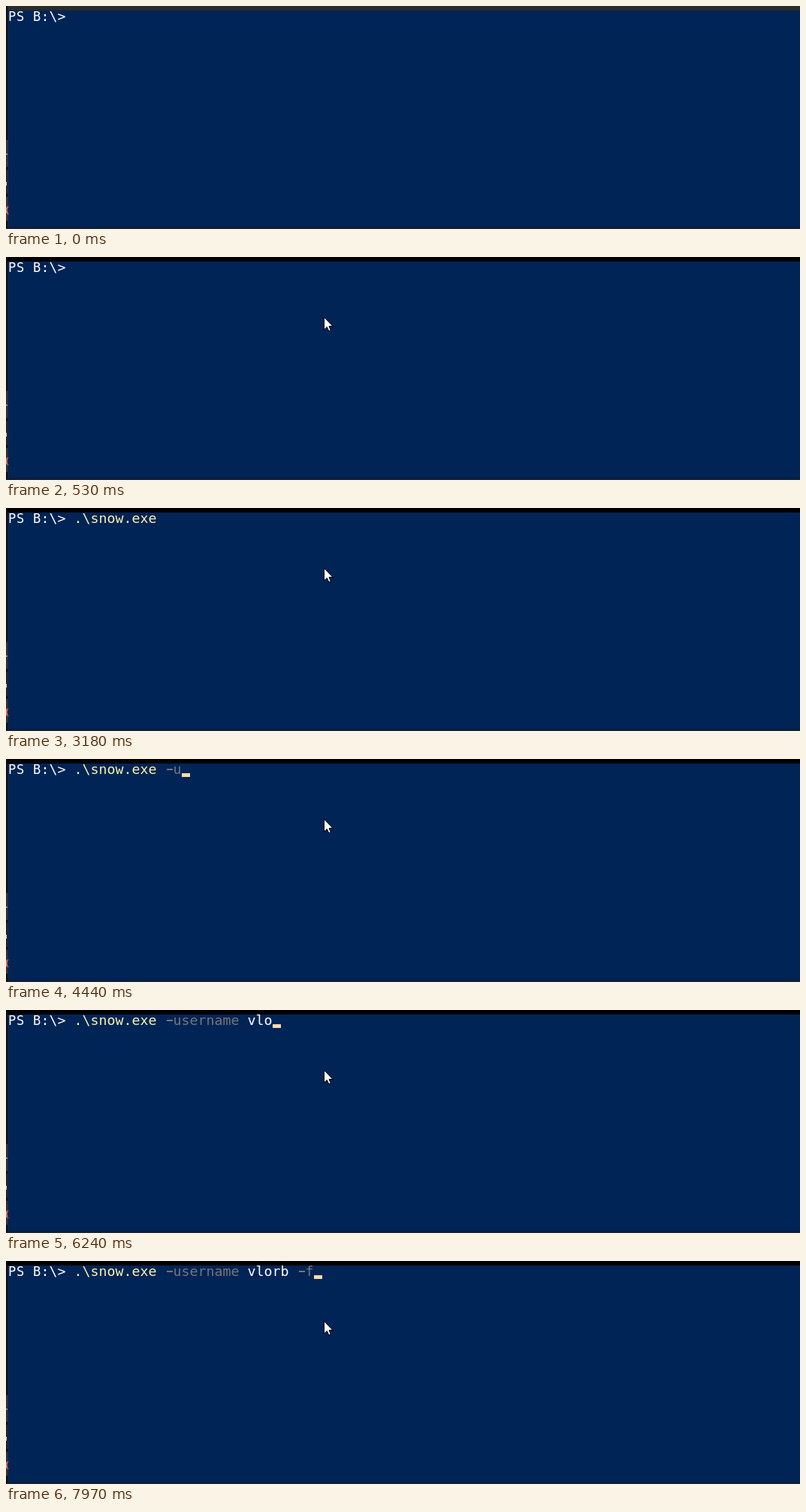
An HTML page with a canvas for the animation above (8000 ms loop, 1057 by 298 pixels).

```html
<!DOCTYPE html>
<html lang="en">
<head>
<meta charset="utf-8">
<title>Terminal</title>
<style>
  html, body { margin: 0; width: 100%; height: 100%; overflow: hidden; background: #012456; }
  canvas { display: block; }
</style>
</head>
<body>
<canvas id="stage" width="1057" height="298"></canvas>
<script>
const ctx = document.getElementById('stage').getContext('2d');
const W = 1057, H = 298, LOOP = 8000;
const LEFT = 3, CELL = 11, BASE = 20;
const BLINK = 530, FOCUS = 530;
const PROMPT = 'PS B:\\> ';
const COMPLETION = '.\\snow.exe';
const COLORS = { prompt: '#fff', command: '#fbf3a7', param: '#767676', caret: '#fedba9' };

// Bursts of typing: keys, start, time between keys. Tab completes the command.
const BURSTS = [
  ['sno', 1990, 165],
  ['\t', 2650, 0],
  [' ', 3510, 0],
  ['-', 4180, 0],
  ['user', 4440, 110],
  ['name', 5110, 86],
  [' vlo', 5570, 223],
  ['r', 6305, 0],
  ['b -', 6700, 300],
  ['f', 7970, 0]
];
const KEYS = BURSTS.flatMap(([keys, start, gap]) =>
  [...keys].map((ch, i) => ({ ch, at: start + i * gap })));

function rect(color, x, y, w, h) {
  ctx.fillStyle = color;
  ctx.fillRect(x, y, w, h);
}

// Capitals are shorter than ascenders, and the dash is a flat bar.
function drawText(text, col, color) {
  ctx.textAlign = 'center';
  ctx.textBaseline = 'alphabetic';
  [...text].forEach((ch, i) => {
    const x = LEFT + (col + i) * CELL;
    if (ch === '-') return rect(color, x + 2, 13, 8, 2);
    const size = /[A-Z]/.test(ch) ? 17 : 18.27;
    ctx.font = `${size}px "DejaVu Sans Mono", monospace`;
    ctx.fillStyle = color;
    ctx.fillText(ch, x + CELL / 2 - 0.5, BASE);
  });
}

function drawCommand(text) {
  let col = PROMPT.length;
  text.split(' ').forEach((word, i) => {
    const color = i === 0 ? COLORS.command : word[0] === '-' ? COLORS.param : COLORS.prompt;
    drawText(word, col, color);
    col += word.length + 1;
  });
}

function drawWindow(focused) {
  rect('#012456', 0, 0, W, H);
  rect('#0b0d11', 0, 0, 3, H);
  rect('#303134', 0, 179, 3, 36);
  rect('#222326', 0, 219, 3, 32);
  rect('#303134', 0, 255, 3, 32);
  rect('#8b8d90', 0, 197, 2, 2);
  rect('#d5d6d8', 0, 235, 1, 5);
  ctx.strokeStyle = '#f0705c';
  ctx.lineWidth = 2;
  ctx.beginPath();
  ctx.arc(7, 273, 6.5, Math.PI * 0.7, Math.PI * 1.3);
  ctx.stroke();
  rect(focused ? 'rgba(40,44,52,.75)' : 'rgba(60,64,70,.5)', 2, 6, 1, H - 6);
  rect('#0a1c3f', 3, 295, W - 3, 2);
  rect('#20262f', 0, 297, W, 1);
  rect(focused ? '#000' : '#2b2b2b', 2, 0, W - 2, 6);
}

function drawPointer(t) {
  if (t < 130) return;
  const step = Math.min(6, Math.floor((t - 130) / 66.6));
  const rest = (1 - step / 6) ** 2;
  const x = 423.5 + 220 * rest, y = 80.5 + 165 * rest;
  ctx.beginPath();
  [[0, 0], [0, 16.5], [3.8, 13], [6.3, 18.5], [8.8, 17.5], [6.5, 12], [11.5, 12]]
    .forEach(([dx, dy]) => ctx.lineTo(x + dx, y + dy));
  ctx.closePath();
  ctx.fillStyle = '#fff';
  ctx.fill();
  ctx.strokeStyle = '#000';
  ctx.lineWidth = 1;
  ctx.stroke();
}

// Each key shows the caret; a steady timer then toggles it.
function caretVisible(t, lastKey) {
  const toggles = Math.floor(t / BLINK) - Math.floor(lastKey / BLINK);
  return t >= FOCUS && toggles % 2 === 0;
}

function draw(now) {
  const t = now % LOOP;
  const pressed = KEYS.filter(key => key.at <= t);
  const typed = pressed.reduce((text, { ch }) => ch === '\t' ? COMPLETION : text + ch, '');
  const lastKey = pressed.length ? pressed[pressed.length - 1].at : 0;
  drawWindow(t >= FOCUS);
  drawText(PROMPT, 0, COLORS.prompt);
  drawCommand(typed);
  if (caretVisible(t, lastKey)) {
    rect(COLORS.caret, LEFT + (PROMPT.length + typed.length) * CELL, 19, CELL, 5);
  }
  drawPointer(t);
}

const start = performance.now();
function tick() {
  draw(performance.now() - start);
  requestAnimationFrame(tick);
}
tick();
</script>
</body>
</html>
```
